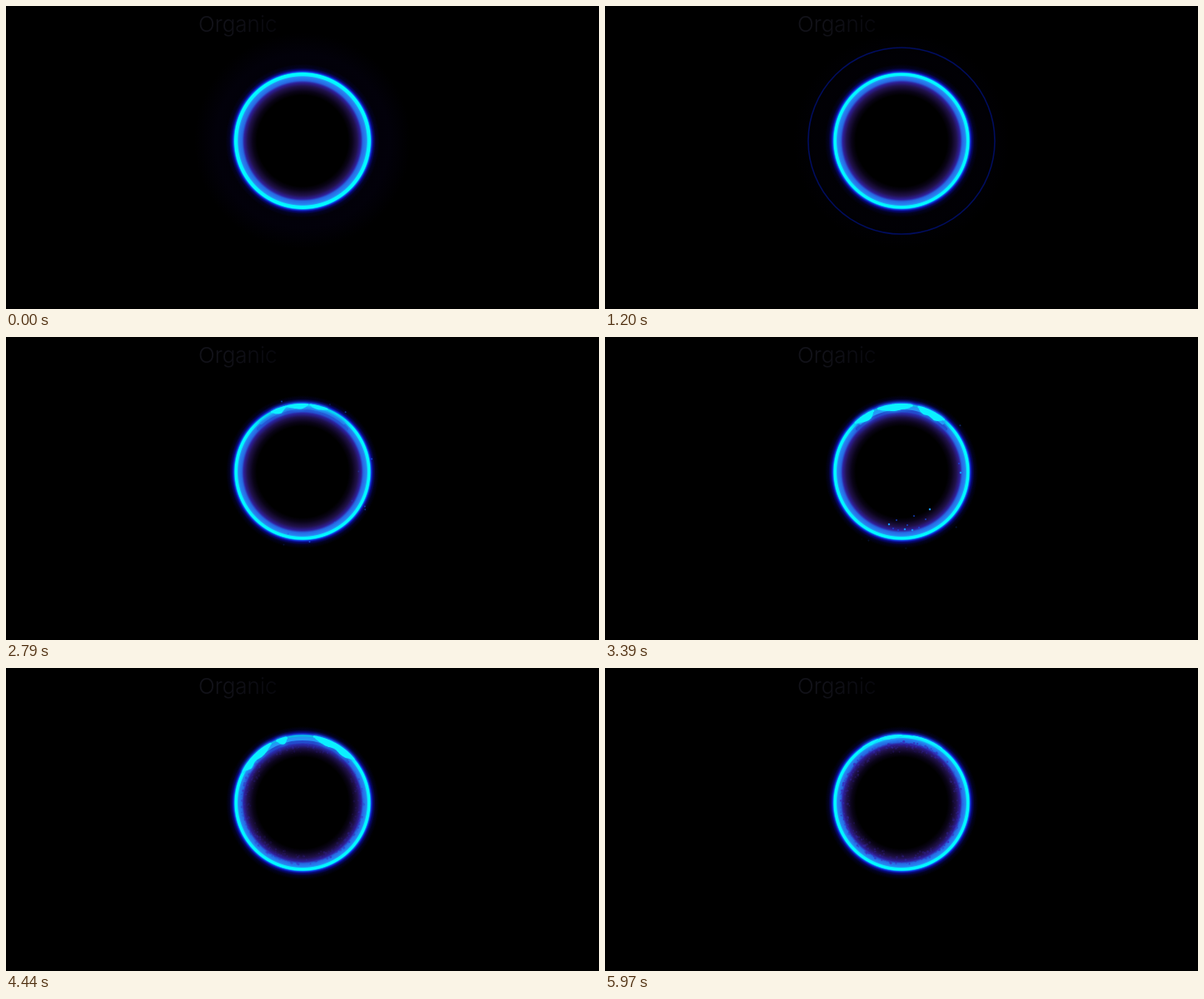
Write an HTML page with a canvas that moves like this. It is 712 by 364 pixels and loops after 6 s.

```html
<!DOCTYPE html>
<html lang="en">
<head>
<meta charset="utf-8">
<title>Organic</title>
<style>
  html, body { margin: 0; width: 100%; height: 100%; overflow: hidden; background: #000; }
  canvas { position: absolute; left: 0; top: 0; }
  h1 {
    position: absolute; left: 231px; top: 6px; margin: 0;
    font: 300 26px/31px Inter, "Liberation Sans", sans-serif;
    color: transparent;
    background: linear-gradient(90deg, #121219 30%, #08080e);
    -webkit-background-clip: text; background-clip: text;
  }
</style>
</head>
<body>
<canvas id="stage" width="712" height="364"></canvas>
<h1>Organic</h1>
<script>
const ctx = document.getElementById('stage').getContext('2d');
const LOOP = 6000, CX = 356, CY = 162, RING = 80, TAU = Math.PI * 2;

const clamp = (v, lo = 0, hi = 1) => Math.min(hi, Math.max(lo, v));
const mix = (a, b, k) => a + (b - a) * k;
const ramp = (t, a, b) => clamp((t - a) / (b - a));
const smooth = k => k * k * (3 - 2 * k);

function seeded(seed) {
  return () => {
    seed = (seed * 16807) % 2147483647;
    return seed / 2147483647;
  };
}

// Each stop: radius at rest, radius at full pulse, colour.
const profile = [
  [55, 51, '#000'], [60, 55.5, '#0a0418'], [66, 60.5, '#20114a'],
  [70.5, 64, '#2f209a'], [73, 66.5, '#2768e2'], [76.6, 74, '#2684f2'],
  [77.5, 75, '#1fa0f4'], [78.4, 76, '#06f2ff'], [81, 86, '#00ffff'],
  [82.6, 87.6, '#1038e0'], [84.5, 89.5, '#08087a'], [87.5, 92, '#020220'], [92, 96, '#000']
];

// Sparks as offsets from the centre at the middle of their flight.
const burst = [
  [-24, -90], [16, -86], [53, -65], [66, -59], [75, -54], [-86, -12],
  [-88, 15], [-87, 28], [-66, 25], [-52, 73], [-29, 56], [-23, 58],
  [14, 67], [9, 89], [91, 41], [89, -10], [68, 69]
];
const drip = [
  [-15, 63], [-6, 58], [15, 53], [34, 45], [29, 57], [7, 64],
  [4, 69], [-10, 68], [-4, 70], [13, 70], [21, 67], [69, -10], [71, 1]
];

// Each key: time, then start angle, end angle (degrees from top), thickness for three flows.
const flowKeys = [
  [1950, -6, -5, 0, -5, -4, 0, -4, -3, 0],
  [2190, -11, -3, 7, -7, 1, 5, -2, 5, 3],
  [3390, -43, -25, 9, -20, 9, 8.5, 15, 39, 9],
  [4440, -62, -28, 8, -22, -14, 11, 10, 50, 8],
  [5970, -35, -20, 4, -18, 0, 5, 10, 37, 3.5]
];

const rnd = seeded(4711);
const grains = Array.from({ length: 520 }, () => ({
  a: rnd() * TAU, r: 59 + 15 * Math.sqrt(rnd()), size: 0.7 + rnd() * 0.9,
  phase: rnd() * TAU, speed: 0.003 + rnd() * 0.006
}));
const strays = Array.from({ length: 30 }, () => ({
  a: rnd() * TAU, start: 2150 + rnd() * 1000, life: 350 + rnd() * 350,
  reach: rnd() < 0.65 ? 6 + rnd() * 14 : -6 - rnd() * 14
}));

function disc(x, y, r, color) {
  ctx.fillStyle = color;
  ctx.beginPath();
  ctx.arc(x, y, r, 0, TAU);
  ctx.fill();
}

function polarDisc(a, r, size, color) {
  disc(CX + Math.cos(a) * r, CY + Math.sin(a) * r, size, color);
}

function radial(stops, outer) {
  const g = ctx.createRadialGradient(CX, CY, 0, CX, CY, outer);
  for (const [r, color] of stops) g.addColorStop(r / outer, color);
  disc(CX, CY, outer, g);
}

function drawRing(pulse) {
  radial(profile.map(([a, b, color]) => [mix(a, b, pulse), color]), 96);
}

function drawHalo(t, pulse) {
  const k = Math.max(pulse, 0.3 * (1 - ramp(t, 900, 1500)));
  if (k <= 0) return;
  const tint = a => `rgba(14,5,66,${a * k})`;
  radial([[87, tint(0)], [91, tint(0.45)], [104, tint(0.5)], [116, tint(0.28)], [130, tint(0)]], 130);
}

function drawWave(t) {
  const k = 1 - Math.pow(1 - ramp(t, 0, 1200), 3);
  const fade = ramp(t, 60, 260) * (1 - ramp(t, 1150, 1500));
  if (!fade) return;
  const c = ramp(t, 540, 1200);
  ctx.strokeStyle = `rgba(${mix(52, 2, c)},${mix(26, 16, c)},${mix(160, 112, c)},${fade})`;
  ctx.lineWidth = mix(2, 1.6, c);
  ctx.beginPath();
  ctx.arc(CX, CY, mix(82, 112, k), 0, TAU);
  ctx.stroke();
}

function drawCrown(t) {
  const k = smooth(ramp(t, 2300, 3300)) * (1 - ramp(t, 4800, 6000));
  if (!k) return;
  ctx.save();
  ctx.globalAlpha = k;
  ctx.shadowColor = '#2340c8';
  ctx.shadowBlur = 8;
  ctx.lineCap = 'round';
  for (const [half, radius, width, color] of [[0.8, 74, 4, '#2450d0'], [0.7, 77, 4, '#2498f6']]) {
    ctx.strokeStyle = color;
    ctx.lineWidth = width;
    ctx.beginPath();
    ctx.arc(CX, CY, radius, -Math.PI / 2 - half, -Math.PI / 2 + half);
    ctx.stroke();
  }
  ctx.restore();
}

function flowAt(t) {
  let i = 0;
  while (i < flowKeys.length - 2 && t > flowKeys[i + 1][0]) i++;
  const [a, b] = [flowKeys[i], flowKeys[i + 1]];
  const k = smooth(ramp(t, a[0], b[0]));
  return a.slice(1).map((v, j) => mix(v, b[j + 1], k));
}

function drawFlows(t) {
  if (t < flowKeys[0][0]) return;
  const v = flowAt(t);
  ctx.save();
  ctx.fillStyle = '#0cf0ff';
  ctx.shadowColor = '#1ca8ff';
  ctx.shadowBlur = 4;
  ctx.beginPath();
  for (let j = 0; j < 9; j += 3) {
    const [from, to, width] = v.slice(j, j + 3);
    for (let d = from; d <= to; d += 0.6) {
      const lump = 0.9 + 0.1 * Math.sin(d * 0.4 + t * 0.004 + j);
      const taper = Math.sqrt(clamp(Math.min(d - from, to - d) / 7, 0.12, 1));
      const size = width / 2 * lump * taper;
      const a = (d - 90) * TAU / 360, r = 82 - size;
      const x = CX + Math.cos(a) * r, y = CY + Math.sin(a) * r;
      ctx.moveTo(x + size, y);
      ctx.arc(x, y, size, 0, TAU);
    }
  }
  ctx.fill();
  ctx.restore();
}

function drawSparks(points, t, start, mid, end, spread) {
  if (t < start || t > end) return;
  const k = t < mid ? Math.sqrt(ramp(t, start, mid)) : 1 + spread * ramp(t, mid, end);
  const fade = 1 - ramp(t, mid, end);
  points.forEach(([x, y], i) => {
    const r = RING + (Math.hypot(x, y) - RING) * k;
    const color = i % 3 ? `rgba(25,75,225,${fade * 0.8})` : `rgba(20,150,255,${fade})`;
    polarDisc(Math.atan2(y, x), r, i % 3 ? 1 : 1.25, color);
  });
}

function drawStrays(t) {
  for (const s of strays) {
    const k = ramp(t, s.start, s.start + s.life);
    if (k <= 0 || k >= 1) continue;
    const r = RING + s.reach * Math.sqrt(k);
    polarDisc(s.a, r, 1, `rgba(30,100,240,${(1 - k) * 0.8})`);
  }
}

function drawGrains(t) {
  const k = ramp(t, 3400, 4900);
  if (!k) return;
  for (const g of grains) {
    const flicker = 0.5 + 0.5 * Math.sin(g.phase + t * g.speed);
    const depth = ramp(g.r, 59, 74);
    const alpha = k * flicker * mix(0.3, 0.75, depth);
    polarDisc(g.a, g.r, g.size, `rgba(${mix(44, 56, depth)},${mix(22, 48, depth)},${mix(100, 195, depth)},${alpha})`);
  }
}

function draw(t) {
  const pulse = t < 1200 ? Math.pow(Math.sin(Math.PI * (t + 120) / 1320), 2) : 0;
  ctx.fillStyle = '#000';
  ctx.fillRect(0, 0, 712, 364);
  drawRing(pulse);
  ctx.globalCompositeOperation = 'lighter';
  drawHalo(t, pulse);
  ctx.globalCompositeOperation = 'source-over';
  drawWave(t);
  drawGrains(t);
  drawCrown(t);
  drawSparks(burst, t, 1920, 2190, 2700, 0.6);
  drawStrays(t);
  drawSparks(drip, t, 3000, 3390, 3900, 0.3);
  drawFlows(t);
}

const begin = performance.now();
function tick() {
  draw((performance.now() - begin) % LOOP);
  requestAnimationFrame(tick);
}
tick();
</script>
</body>
</html>
```
